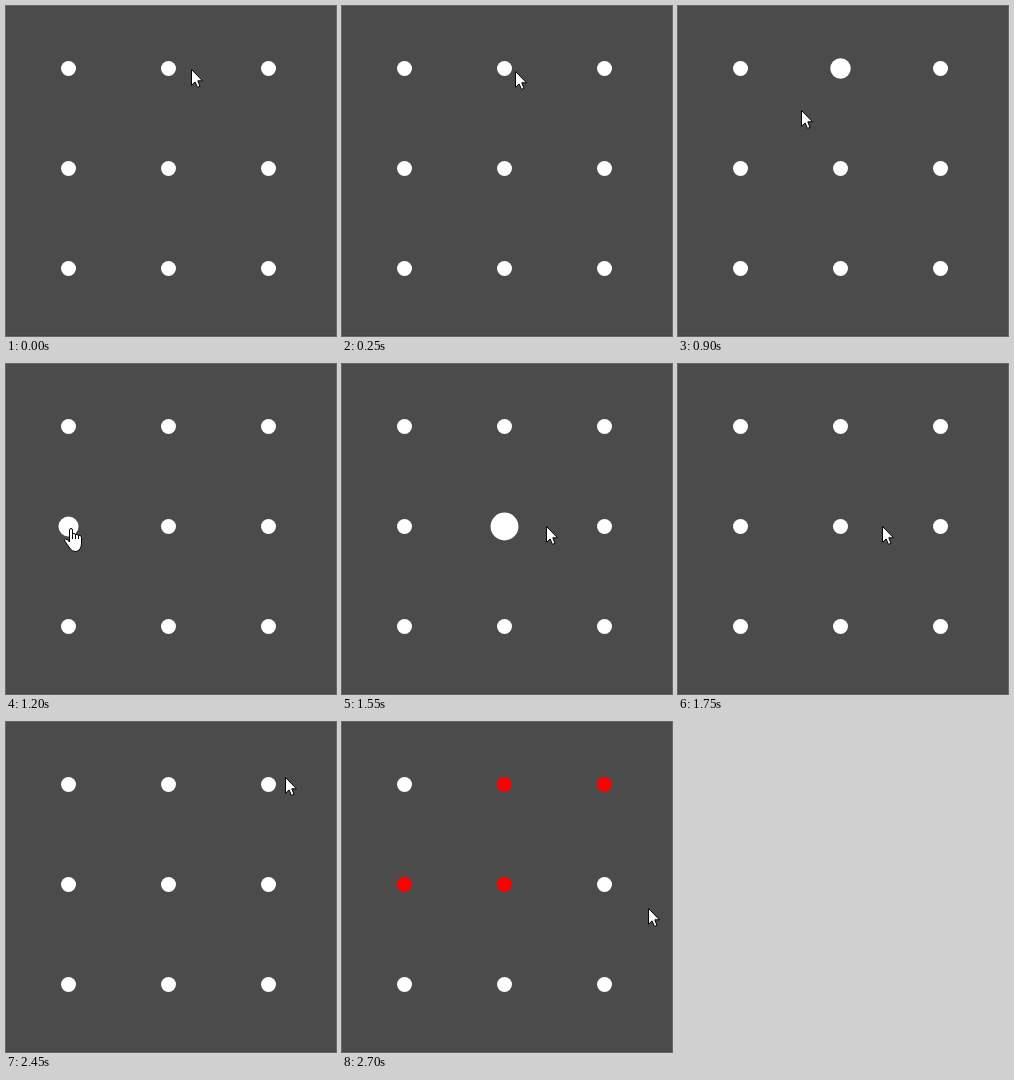
An HTML page that plays this animation: 330x330 px, repeating every 3100 ms.

```html
<!DOCTYPE html>
<html lang="en">
<head>
<meta charset="utf-8">
<title>Pattern lock</title>
<style>
  html, body { margin: 0; width: 100%; height: 100%; overflow: hidden; background: #4b4b4b; }
  svg { display: block; width: 330px; height: 330px; }
  #cursor path { fill: #fff; stroke: #000; stroke-width: 1; stroke-linejoin: round; }
  #hand path + path { fill: none; }
</style>
</head>
<body>
<svg viewBox="0 0 330 330">
  <rect width="330" height="330" fill="#4b4b4b"/>
  <rect y="329" width="330" height="1" fill="#474344"/>
  <g id="dots"></g>
  <g id="cursor">
    <path id="arrow" d="M.5 .5V16.3L4.1 12.9L6.5 18.4L9 17.4L6.8 11.8H11.5Z"/>
    <g id="hand" transform="translate(-7 0)">
      <path d="M5.5 14V2Q5.5 .5 7 .5T8.5 2V6.5Q8.5 5.5 10 5.5T11.5 7Q11.8 6.2 13 6.3T14.5 8Q15 7.3 16 7.5Q17.5 7.8 17.5 9.5V15Q17.5 18.5 16 21Q14.5 23.5 11.5 23.5Q8 23.5 6.3 20.8L1 13.4Q0 11.5 1.5 11Q3 10.6 5.5 14Z"/>
      <path d="M8.5 6.5V11M11.5 7V11M14.5 8V11"/>
    </g>
  </g>
</svg>
<script>
const LOOP = 3100, TICK = 50, HALF = 150, RADIUS = 7.5, FAIL = 2550;

// Dot index -> time at which the pattern reaches it
const hits = { 1: 690, 3: 1172, 4: 1456, 2: 2140 };

// Straight pointer moves from the starting place
const home = { x: 185, y: 63 };
const moves = [
  { from: 50, to: 500, x: 159, y: 67 },
  { from: 720, to: 1190, x: 65, y: 164 },
  { from: 1260, to: 1550, x: 204, y: 162 },
  { from: 1920, to: 2050, x: 265, y: 69 },
  { from: 2050, to: 2350, x: 283, y: 54 },
  { from: 2350, to: 2450, x: 279, y: 55 },
  { from: 2450, to: 2700, x: 306, y: 186 }
];

const $ = id => document.getElementById(id);
const clamp = p => Math.min(1, Math.max(0, p));
const easeOut = p => 1 - (1 - p) ** 2;

const dots = Array.from({ length: 9 }, (_, i) => {
  const el = document.createElementNS($("dots").namespaceURI, "circle");
  const x = 62.5 + i % 3 * 100, y = 62.5 + Math.floor(i / 3) * 100;
  el.setAttribute("cx", x);
  el.setAttribute("cy", y);
  $("dots").append(el);
  return { el, x, y, start: hits[i] ?? Infinity };
});

// A hit dot swells to double size and shrinks back
function radius(start, t) {
  const p = (t - start) / HALF;
  return RADIUS * (1 + easeOut(clamp(p)) - easeOut(clamp(p - 1)));
}

function pointer(t) {
  let { x, y } = home;
  for (const m of moves) {
    const k = clamp((t - m.from) / (m.to - m.from));
    x += (m.x - x) * k;
    y += (m.y - y) * k;
  }
  return [Math.round(x), Math.round(y)];
}

function draw(t) {
  const [x, y] = pointer(t);
  let over = false;
  for (const d of dots) {
    const r = radius(d.start, t);
    d.el.setAttribute("r", r);
    d.el.setAttribute("fill", d.start < LOOP && t >= FAIL ? "#f00" : "#fff");
    over ||= Math.hypot(x - d.x, y - d.y) < r;
  }
  $("cursor").setAttribute("transform", `translate(${x} ${y})`);
  $("hand").style.display = over ? "" : "none";
  $("arrow").style.display = over ? "none" : "";
}

const begin = performance.now();
function frame() {
  const t = (performance.now() - begin) % LOOP;
  draw(Math.floor(t / TICK) * TICK);
  requestAnimationFrame(frame);
}
frame();
</script>
</body>
</html>
```
